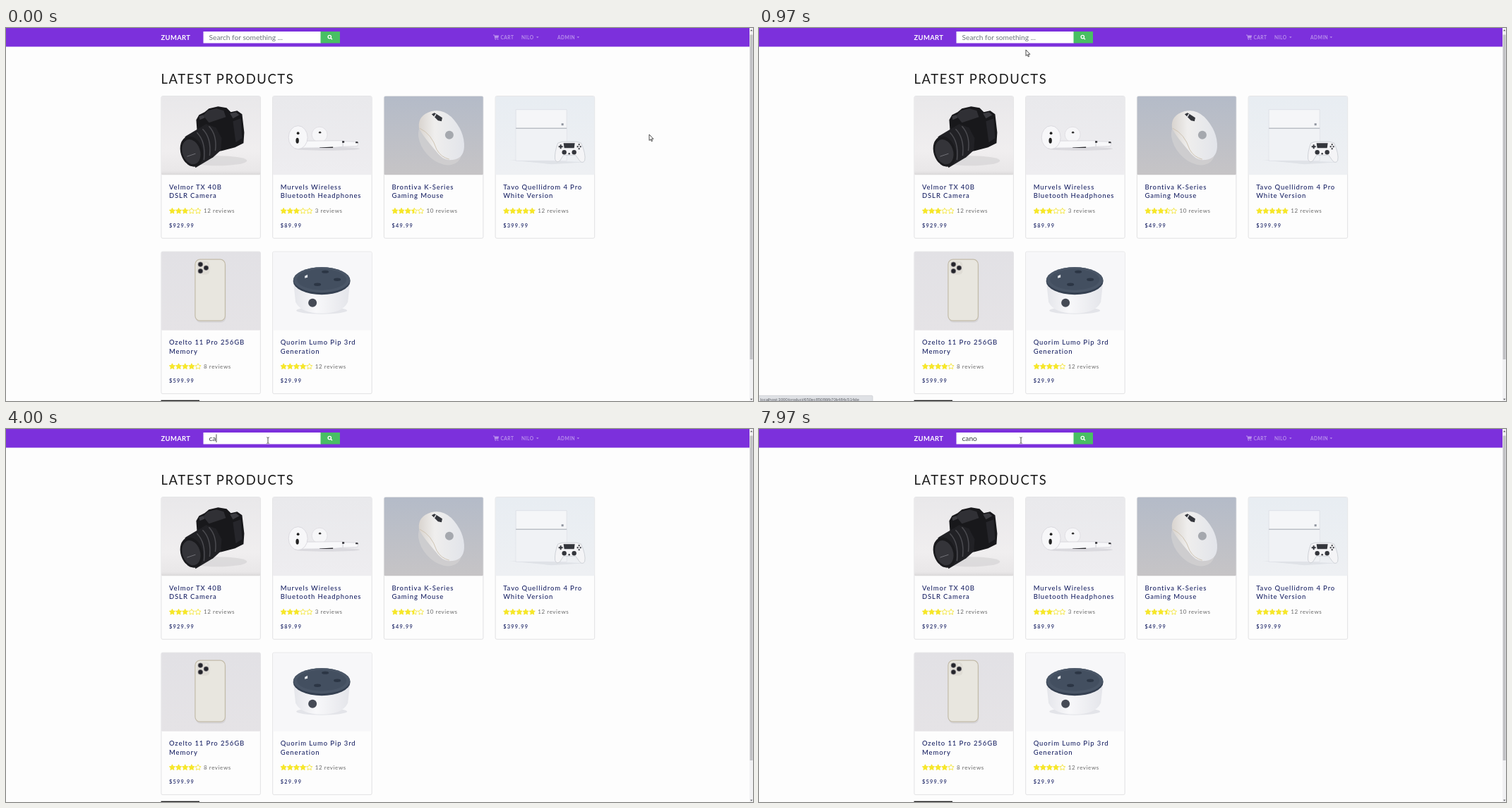
Animation of 1058x529 px, one loop 8 s. Source, as an HTML page:

```html
<!DOCTYPE html>
<html lang="en">
<head>
<meta charset="utf-8">
<title>Shop</title>
<style>
html, body { margin: 0; width: 100%; height: 100%; overflow: hidden; background: #fdfdfd; }
svg { display: block; width: 1058px; height: 529px; font-family: Lato, "Open Sans", sans-serif; }
.brand { font-size: 9.4px; font-weight: 700; letter-spacing: .4px; fill: #fff; }
.nav { font-size: 6.6px; font-weight: 700; letter-spacing: .45px; fill: #b98fec; }
.field { font-size: 10.2px; fill: #6c757d; }
.head { font-size: 18.4px; letter-spacing: 1.6px; fill: #1a1a1a; }
.name { font-size: 9.5px; font-weight: 500; letter-spacing: .9px; fill: #1c2566; }
.reviews { font-size: 8px; letter-spacing: .6px; fill: #6a6a6a; }
.price { font-size: 7.3px; font-weight: 600; letter-spacing: 1.3px; fill: #1c2566; }
.url { font: 6px "Liberation Sans", sans-serif; fill: #5c5f66; }
</style>
</head>
<body>
<svg viewBox="0 0 1058 529">
  <defs>
    <linearGradient id="desk" x2="0" y2="1"><stop stop-color="#e9e8ea"/><stop offset=".7" stop-color="#f0eeef"/><stop offset=".95" stop-color="#e9e7e8"/><stop offset="1" stop-color="#dad8d9"/></linearGradient>
    <linearGradient id="pale" x2="0" y2="1"><stop stop-color="#e9e9ec"/><stop offset="1" stop-color="#eeedf0"/></linearGradient>
    <linearGradient id="grey" x2="0" y2="1"><stop stop-color="#e2e1e5"/><stop offset="1" stop-color="#e5e3e6"/></linearGradient>
    <linearGradient id="steel" x2="0" y2="1"><stop stop-color="#b4bbc8"/><stop offset="1" stop-color="#c6c4c6"/></linearGradient>
    <linearGradient id="cool" x2="0" y2="1"><stop stop-color="#e8edf2"/><stop offset="1" stop-color="#eef0f3"/></linearGradient>
    <linearGradient id="shell" x2="1"><stop stop-color="#d9d4cf"/><stop offset=".35" stop-color="#efeeed"/><stop offset="1" stop-color="#e2e4ea"/></linearGradient>
    <linearGradient id="base" x2="1"><stop stop-color="#e4e5ea"/><stop offset=".4" stop-color="#f8f8fa"/><stop offset="1" stop-color="#e4e5ea"/></linearGradient>
  </defs>

  <rect width="1058" height="529" fill="#fdfdfd"/>
  <rect width="1053" height="26.5" fill="#7c30dc"/>
  <text class="brand" x="219.5" y="16.8">ZUMART</text>
  <path fill="#fff" d="M279.5 5H446v16.5H279.5z"/>
  <path fill="#48bf63" d="M445.5 5H473v16.5H445.5z"/>
  <g fill="none" stroke="#fff" stroke-width="1.3"><circle cx="458.3" cy="12.6" r="2.2"/><path d="M460 14.3l2 2"/></g>
  <text id="field" class="field" x="287.5" y="16.8"></text>
  <path id="caret" stroke="#222" stroke-width=".8" d="M0 7.5v11.5"/>

  <g fill="#b98fec">
    <path d="M690 9.6h1.7l.4 1h6l-.8 3.4h-4.3l.1.7h4v.8h-4.7l-1-5.1H690z"/>
    <circle cx="693.3" cy="16" r=".8"/><circle cx="696.7" cy="16" r=".8"/>
    <path d="M751 12.2h3.6l-1.8 2zM808.5 12.2h3.6l-1.8 2z"/>
  </g>
  <text class="nav" x="700.5" y="15.5">CART</text>
  <text class="nav" x="730" y="15.5">NILO</text>
  <text class="nav" x="781" y="15.5">ADMIN</text>

  <text class="head" x="219.5" y="78.5">LATEST PRODUCTS</text>
  <path fill="#1a1a1a" d="M219.5 527.8H274V529H219.5z"/>
  <g id="cards"></g>

  <path fill="#f1f1f3" d="M1053 0h5v529h-5z"/>
  <path fill="#c1c1c4" d="M1053.6 9.5h4V470h-4z"/>
  <path fill="#55555a" d="M1054 4.2l1.7-2 1.7 2zM1054 525.8l1.7 2 1.7-2z"/>

  <g id="status">
    <path fill="#dfe1e5" stroke="#c3c5ca" stroke-width=".6" d="M-1 521.3H159.5q1.5 0 1.5 1.5V530H-1z"/>
    <text class="url" x="2" y="529">localhost:3000/product/650ec85086fb70b484c514de</text>
  </g>

  <g fill="#fff" stroke="#222" stroke-width=".8" stroke-linejoin="round">
    <path id="arrow" d="M0 0v8.5l1.9-1.7 1.4 3 1.3-.6-1.4-2.9h2.7z"/>
    <path id="hand" d="M-.8 6.5V1q.8-1.3 1.6 0v3.6l3.8.9q1 .3.9 1.5l-.7 3.5-.8 2h-4.5l-1.4-2.3-2.4-2.9q.4-1.3 1.7-.4z"/>
    <path id="beam" fill="none" d="M-1.7-4.2q1.5 0 1.7.8.2-.8 1.7-.8M0-3.4v7M-1.7 4.4q1.5 0 1.7-.8.2.8 1.7.8"/>
  </g>
</svg>

<script>
const $ = id => document.getElementById(id);
const clamp = v => Math.max(0, Math.min(1, v));

// Product pictures, in card coordinates (0,0 to 141,112)
const camera = `
  <ellipse cx="80" cy="92" rx="42" ry="7" fill="#d3d1d3" opacity=".6"/>
  <path fill="#18181b" d="M50 34l4-7 8-4 6-5 13-3 12 2 6 6 9-2 7 5 3 26-1 15-12 6-19 5-20 3-14-20z"/>
  <path fill="#303035" d="M60 28l6-7 13-3 10 3 3 9-24 8z"/>
  <path fill="#3b3b40" d="M98 25l8-2 5 4-9 5zM54 29l6-2 2 4-7 3z"/>
  <path fill="#26262b" d="M102 36l11-4 2 28-9 6z"/>
  <path fill="#212125" d="M34 58l30-18 14 5 8 15-1 17-11 10-25 15z"/>
  <g fill="none" stroke="#4b4b50" stroke-width="1.5">
    <path d="M51 52q13 13 10 39M59 47q13 13 10 38M68 43q12 13 9 35"/>
  </g>
  <ellipse cx="43.5" cy="79" rx="15.5" ry="22" transform="rotate(-18 43.5 79)" fill="#1a1a1d"/>
  <ellipse cx="43" cy="79.5" rx="12.5" ry="18" transform="rotate(-18 43 79.5)" fill="#343439"/>
  <path stroke="#717177" d="M37 86l12-4"/>`;

const buds = `
  <ellipse cx="78" cy="75" rx="46" ry="2.5" fill="#d3d2d7" opacity=".7"/>
  <circle cx="67" cy="55" r="11" fill="#f6f6f8" stroke="#dcdbe0" stroke-width=".8"/>
  <path fill="#f8f8fa" stroke="#d5d4da" stroke-width=".8" d="M44 64l56-.5v8.5l-14 1.500-44 .5zM100 64.500l20.500.500q2 3 0 6.500l-20.500.500z"/>
  <path fill="#2c2c31" d="M99 64h3v2.500h-3zM118 65h3l.8 2H118zM67 73.200l19-1v1.500H67z"/>
  <ellipse cx="36.500" cy="59" rx="13.500" ry="16.500" fill="#f7f7f9" stroke="#d5d4da" stroke-width=".8"/>
  <circle cx="36.500" cy="53" r="1.900" fill="#222"/><ellipse cx="35.500" cy="63.500" rx="2.200" ry="4" fill="#222"/>
  <ellipse cx="67.500" cy="52" rx="1.700" ry="1.400" fill="#333"/>`;

const mouse = `
  <ellipse cx="80" cy="66" rx="37" ry="25" transform="rotate(48 80 66)" fill="#d8d6d6" opacity=".6"/>
  <path fill="url(#shell)" d="M50 45Q48 28 67 22q16-4 29 8 19 20 18 43-1 18-21 18-10 0-20-14-20-23-23-32z"/>
  <path fill="none" stroke="#cfc4b2" d="M51 46q17 8 24 30 6 11 18 14"/>
  <path fill="#34363c" d="M68 26l4-2 11 7-1 5-5-1z"/>
  <path stroke="#e7e7e9" stroke-width="1.5" d="M74 26l-3 5"/>
  <circle cx="93" cy="55.5" r="6" fill="#a5a8ae"/>`;

const gamebox = `
  <path fill="#dfe2e7" d="M20 91l58 1 50 2-48 3z"/>
  <path fill="#f5f6f8" stroke="#d9dce2" stroke-width=".7" d="M29.5 19.5h72V92h-72z"/>
  <path fill="#f0f2f5" d="M30 46h71v45H30z"/>
  <path stroke="#a0a5af" d="M29.5 46h72"/>
  <path fill="#8f949e" d="M94 39h3v3h-3z"/>
  <path fill="#f4f4f6" stroke="#c6c9d0" stroke-width=".8" d="M89 67l6-2h20l7 2q7 16 5 25-4 5-8-1l-5-7H97l-5 8q-5 4-7-2-1-10 4-23z"/>
  <path fill="#34363c" d="M97 67h16l-1 7H98z"/>
  <g fill="#34363c"><circle cx="98" cy="80" r="3.2"/><circle cx="112" cy="80" r="3.2"/>
  <path d="M90 71h2v-2h2v2h2v2h-2v2h-2v-2h-2zM116 71h2v2h-2zM120 71h2v2h-2zM118 68h2v2h-2zM118 74h2v2h-2z"/></g>
  <circle cx="105" cy="82" r="1.2" fill="#34363c"/>`;

const phone = `
  <rect x="49" y="13" width="43" height="88" rx="7" fill="#cdcbcd" opacity=".6"/>
  <rect x="48.5" y="11.5" width="42.5" height="87" rx="7" fill="#e8e6df" stroke="#c3bcaa" stroke-width="1.2"/>
  <rect x="51" y="14" width="18" height="19" rx="5" fill="#dfdcd5"/>
  <g fill="#24242b" stroke="#77747a" stroke-width=".7"><circle cx="56" cy="18.5" r="3.3"/><circle cx="56" cy="28" r="3.3"/><circle cx="64" cy="23.5" r="3.3"/></g>
  <circle cx="64" cy="17.5" r="1" fill="#f8f7f0"/>`;

const speaker = `
  <ellipse cx="70" cy="84" rx="36" ry="5" fill="#e3e4e9"/>
  <path fill="url(#base)" d="M30 44l3 28q8 16 37 16t37-16l3-28z"/>
  <ellipse cx="70" cy="42" rx="40.5" ry="19.5" fill="#354051"/>
  <ellipse cx="70" cy="40.5" rx="40" ry="18" fill="#4a5667"/>
  <ellipse cx="70" cy="40" rx="35" ry="15" fill="#434f60"/>
  <g fill="#2c3645"><ellipse cx="75" cy="29" rx="5" ry="2"/><ellipse cx="92" cy="40" rx="5" ry="2.2"/><ellipse cx="64" cy="47" rx="5" ry="2.2"/></g>
  <path fill="#e5e8ed" d="M46 35l4-2v4l-4 1z"/>
  <circle cx="57" cy="73" r="6" fill="#454a55"/>`;

const products = [
  ["Velmor TX 40B", "DSLR Camera", 3, 12, "929.99", "desk", camera],
  ["Murvels Wireless", "Bluetooth Headphones", 3, 3, "89.99", "pale", buds],
  ["Brontiva K-Series", "Gaming Mouse", 3.5, 10, "49.99", "steel", mouse],
  ["Tavo Quellidrom 4 Pro", "White Version", 5, 12, "399.99", "cool", gamebox],
  ["Ozelto 11 Pro 256GB", "Memory", 4, 8, "599.99", "grey", phone],
  ["Quorim Lumo Pip 3rd", "Generation", 4, 12, "29.99", "#f7f7f9", speaker],
];

// Ten star vertices clockwise from the top; six of them make the left half
function star(x, y, fill) {
  const pts = [...Array(10).keys()].map(i => {
    const r = i % 2 ? 2.1 : 4.3, a = i * Math.PI / 5;
    return [x + r * Math.sin(a), y - r * Math.cos(a)];
  });
  const poly = (p, attrs) => `<polygon points="${p.join(" ")}" ${attrs}/>`;
  const line = `stroke="#f3e321" stroke-width=".8" stroke-linejoin="round"`;
  return poly(pts, `${line} fill="${fill === 1 ? "#f8e825" : "none"}"`) +
    (fill === .5 ? poly([...pts.slice(5), pts[0]], `fill="#f8e825"`) : "");
}

function card([line1, line2, rating, reviews, price, bg, art]) {
  const fill = bg[0] === "#" ? bg : `url(#${bg})`;
  const stars = [0, 1, 2, 3, 4].map(k => star(16 + k * 9.15, 163.4, clamp(rating - k))).join("");
  return `<g>
    <rect x=".5" y=".5" width="140.5" height="201.5" rx="2" fill="#fdfdfd" stroke="#dedee0" stroke-width=".9"/>
    <rect x=".8" y=".8" width="140" height="111.3" rx="1.5" fill="${fill}"/>${art}
    <text class="name" x="11.5" y="132.5">${line1}</text>
    <text class="name" x="11.5" y="145.2">${line2}</text>${stars}
    <text class="reviews" x="60.5" y="166.3">${reviews} reviews</text>
    <text class="price" x="11.5" y="186.7">$${price}</text></g>`;
}
$("cards").innerHTML = products.map(card).join("");
const cards = [...$("cards").children];

// Pointer path: time, x, y
const path = [[30, 911, 151], [75, 836, 144], [130, 690, 130], [290, 530, 112], [400, 438, 102.5],
  [560, 412, 84], [830, 385, 42], [970, 378, 31], [1530, 371, 16]];
// Card index: time the pointer enters and leaves
const hovers = { 3: [75, 125], 2: [140, 293], 1: [295, 490] };
const typed = [[3600, "c"], [4000, "ca"], [4370, "can"], [6370, "cano"]];
const caretOn = [[2000, 2530], [3000, 4900], [5400, 5970], [6370, 6900], [7470, 7970]];
const within = (t, [a, b]) => t >= a && t < b;
const show = (id, on) => $(id).setAttribute("visibility", on ? "visible" : "hidden");

function pointerAt(t) {
  const n = path.findIndex(p => p[0] > t);
  if (n === 0) return path[0].slice(1);
  if (n < 0) return path.at(-1).slice(1);
  const [a, b] = [path[n - 1], path[n]], k = (t - a[0]) / (b[0] - a[0]);
  return [a[1] + (b[1] - a[1]) * k, a[2] + (b[2] - a[2]) * k];
}

function draw(t) {
  cards.forEach((g, i) => {
    const [enter, leave] = hovers[i] || [9e3, 9e3];
    const lift = Math.min(clamp((t - enter) / 100), clamp(1 - (t - leave) / 300));
    const x = 219.4 + i % 4 * 157.75, y = 96.2 + (i > 3) * 220.5;
    g.setAttribute("transform",
      `translate(${x + 70.7} ${y + 101.3}) scale(${1 + .06 * lift}) translate(-70.7 -101.3)`);
  });

  const word = typed.filter(k => t >= k[0]).at(-1)?.[1];
  const field = $("field");
  field.textContent = word || "Search for something ...";
  field.style.fill = word ? "#343a40" : "";
  const end = word ? field.getComputedTextLength() : 0;
  $("caret").setAttribute("transform", `translate(${288 + end} 0)`);
  show("caret", caretOn.some(span => within(t, span)));
  show("status", within(t, [130, 1200]));

  const [x, y] = pointerAt(t);
  const shape = y < 22 ? "beam" : Object.values(hovers).some(span => within(t, span)) ? "hand" : "arrow";
  for (const id of ["arrow", "hand", "beam"]) show(id, id === shape);
  $(shape).setAttribute("transform", `translate(${x} ${y})`);
}

const start = performance.now();
function tick(now) {
  draw(Math.max(0, now - start) % 8000);
  requestAnimationFrame(tick);
}
draw(0);
requestAnimationFrame(tick);
</script>
</body>
</html>
```
